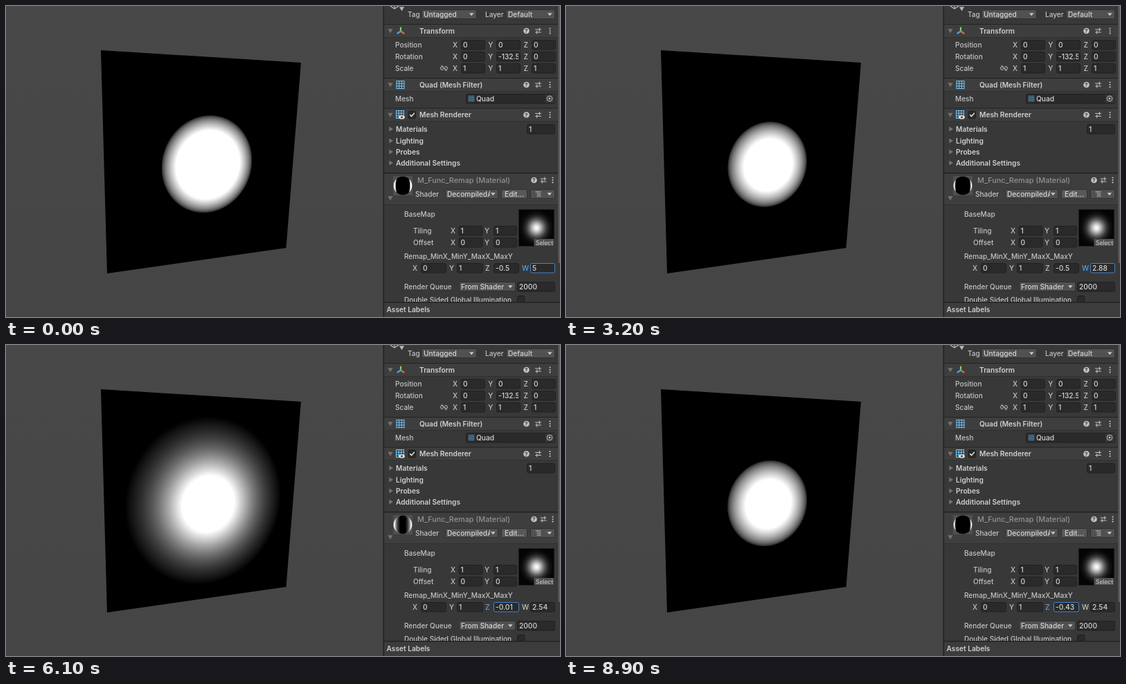
Recreate the animation shown at these times as an HTML page with a canvas. Size 800 px wide and 450 px high, loop 9.3 s.

```html
<!DOCTYPE html>
<html lang="en">
<head>
<meta charset="utf-8">
<title>Remap material</title>
<style>
html, body { margin: 0; width: 100%; height: 100%; overflow: hidden; background: #464646; }
#stage { position: absolute; left: 0; top: 0; width: 800px; height: 450px; overflow: hidden;
  background: linear-gradient(#484848, #454545); }
#stage > * { position: absolute; left: 0; top: 0; display: block; }
#quad { clip-path: polygon(137px 64px, 426px 82px, 404.5px 350px, 146px 387px); }
#stage #ball { left: 559px; top: 246px; }
text { font-family: Inter, "Liberation Sans", sans-serif; font-size: 10.05px; font-weight: 500; fill: #c4c4c4; white-space: pre; }
.b { font-size: 10.2px; font-weight: 600; fill: #d0d0d0; }
.v { font-size: 10.2px; fill: #d6d6d6; }
</style>
</head>
<body>
<div id="stage">
  <canvas id="quad" width="440" height="400"></canvas>
  <svg id="panel" width="800" height="450" viewBox="0 0 800 450"></svg>
  <canvas id="ball" width="28" height="28"></canvas>
</div>
<script>
const LOOP = 9300, STEP = 100;
const glow = r => Math.exp(-.4 * r - 3.85 * r * r);
const $ = id => document.getElementById(id);

// ---- inspector panel ----
let out = '';
const add = s => { out += s; };
const rect = (x, y, w, h, fill, more = '') =>
  add(`<rect x="${x}" y="${y}" width="${w}" height="${h}" fill="${fill}" ${more}/>`);
const path = (d, color, w = 1) =>
  add(`<path d="${d}" fill="none" stroke="${color}" stroke-width="${w}" stroke-linecap="round" stroke-linejoin="round"/>`);
const text = (x, y, s, more = '') => add(`<text x="${x}" y="${y + 3.7}" ${more}>${s}</text>`);
const dot = (x, y, r, fill) => add(`<circle cx="${x}" cy="${y}" r="${r}" fill="${fill}"/>`);
const tri = (x, y, open, fill = '#747474') => add(open
  ? `<path d="M${x - 3.6} ${y - 2.8}h7.2l-3.6 6z" fill="${fill}"/>`
  : `<path d="M${x - 2.6} ${y - 3.6}v7.2l5.6-3.6z" fill="${fill}"/>`);
let clips = 0;

function field(x, y, w, s, id = '') {
  rect(x + .5, y - 6.5, w - 1, 13.5, '#2a2a2a', `rx="2" stroke="#212121" ${id && `id="${id}Box"`}`);
  const clip = 'c' + clips++;
  add(`<clipPath id="${clip}"><rect x="${x + 1}" y="${y - 7}" width="${w - 4}" height="14"/></clipPath>`);
  text(x + 3, y, s, `class="v" clip-path="url(#${clip})" ${id && `id="${id}Text"`}`);
}
function drop(x, y, w, s) {
  rect(x + .5, y - 6.5, w - 1, 13, '#515151', 'rx="2" stroke="#303030"');
  const clip = 'c' + clips++;
  add(`<clipPath id="${clip}"><rect x="${x}" y="${y - 7}" width="${w - 12}" height="14"/></clipPath>`);
  text(x + 3, y, s, `class="v" clip-path="url(#${clip})"`);
  add(`<path d="M${x + w - 11} ${y - 1.8}h6.6l-3.3 4z" fill="#c8c8c8"/>`);
}
function vec(y, vals) {
  ['X', 'Y', 'Z'].forEach((k, i) => {
    text(645 + i * 51.3, y, k);
    field(657 + i * 51, y, 35, vals[i]);
  });
}
function tools(y, xs) {
  const [a, b, c] = xs;
  dot(a, y, 4.3, '#c4c4c4');
  text(a - 2.4, y - .6, '?', 'style="font-size:8px;font-weight:700;fill:#3a3a3a"');
  path(`M${b - 4} ${y - 2}h8M${b - 4} ${y + 2}h8M${b + 1.8} ${y - 4}v4M${b - 1.8} ${y}v4`, '#c4c4c4', 1.1);
  [-3.4, 0, 3.4].forEach(d => dot(c, y + d, 1.05, '#c4c4c4'));
}
function mesh(x, y, r, line, w) {
  rect(x - r, y - r, r * 2, r * 2, '#2f4350', 'rx="1"');
  let d = '';
  for (let i = 0; i < 4; i++) {
    const p = -r + i * r * 2 / 3;
    d += `M${x - r} ${y + p}h${r * 2}M${x + p} ${y - r}v${r * 2}`;
  }
  path(d, line, w);
}
function header(y, title) {
  rect(546, y - 10, 254, 20, '#3e3e3e');
  rect(546, y - 10, 254, 1, '#222');
  rect(546, y + 9, 254, 1, '#303030');
  tri(555, y, true);
  text(597, y, title, 'class="b"');
  tools(y, [751.5, 768.5, 785.5]);
}
function check(x, y) {
  rect(x + .5, y - 5.5, 10.5, 11, '#2a2a2a', 'rx="2" stroke="#1e1e1e"');
}

function buildPanel() {
  rect(545, 0, 255, 450, '#383838');
  path('M555 0l6 4l6-4M561 4v-4', '#c4c4c4', 1.1);
  tri(571.5, 4, true, '#b8b8b8');
  text(580, 12, 'Tag');
  drop(600, 12, 80, 'Untagged');
  text(692, 12, 'Layer');
  drop(722, 12, 71, 'Default');

  header(36, 'Transform');
  path('M570 36.5v-5', '#8fd14a', 2.2);
  path('M570 36.5l4.5 3', '#e8643c', 2.2);
  path('M570 36.5l-4.5 3', '#4ba3e6', 2.2);
  text(562, 56, 'Position'); vec(56, ['0', '0', '0']);
  text(562, 73, 'Rotation'); vec(73, ['0', '-132.5', '0']);
  text(562, 90, 'Scale'); vec(90, ['1', '1', '1']);
  path('M631 87.5h-1a2.4 2.4 0 0 0 0 5h1M634 87.5h1a2.4 2.4 0 0 1 0 5h-1M630.5 90h4M629 86l7 8', '#c4c4c4');

  header(114, 'Quad (Mesh Filter)');
  mesh(569.5, 114, 5.5, '#7fc3ee', 1);
  text(562, 134, 'Mesh');
  field(664, 134, 129, '');
  mesh(672, 134, 3.8, '#5f93b4', .6);
  text(679, 134, 'Quad', 'class="v"');
  rect(779, 128, 13, 12, '#373737');
  add('<circle cx="785" cy="134" r="3.8" fill="none" stroke="#c4c4c4"/>');
  dot(785, 134, 1.4, '#c4c4c4');

  header(157.5, 'Mesh Renderer');
  mesh(569, 157, 5.5, '#7fc3ee', 1);
  add('<ellipse cx="571.5" cy="161" rx="4.4" ry="2.8" fill="#dedede"/>');
  dot(571.5, 161, 1.4, '#3e3e3e');
  check(580.5, 157.5);
  path('M583.5 157.5l2 2.3l4-4.6', '#e0e0e0', 1.5);
  [['Materials', 178], ['Lighting', 195], ['Probes', 211], ['Additional Settings', 227]].forEach(([s, y]) => {
    tri(556, y, false);
    text(563, y, s, 'class="b"');
  });
  field(752, 178, 41, '1');

  rect(546, 242, 254, 46, '#3e3e3e');
  rect(546, 241, 254, 1.5, '#222');
  rect(546, 287, 254, 1, '#303030');
  rect(559, 246, 28, 28, '#505050');
  tri(555, 278, true);
  text(594, 252, 'M_Func_Remap (Material)', 'style="font-size:10.8px;fill:#929292"');
  tools(252, [762.5, 776, 789.5]);
  text(591, 272, 'Shader');
  drop(634, 272, 77, 'DecompiledArt');
  rect(715.5, 265.5, 37, 13, '#585858', 'rx="2" stroke="#303030"');
  text(720, 272, 'Edit...', 'class="v"');
  rect(757.5, 265.5, 35, 13, '#515151', 'rx="2" stroke="#303030"');
  path('M765 269h7M767 272h5M767 275h5', '#c8c8c8', 1.1);
  add('<path d="M781.5 270.2h6.6l-3.3 4z" fill="#c8c8c8"/>');

  text(575, 301, 'BaseMap');
  [['Tiling', 325, '1'], ['Offset', 342, '0']].forEach(([s, y, n]) => {
    text(588, y, s);
    text(642, y, 'X'); field(653.5, y, 35, n);
    text(691, y, 'Y'); field(704, y, 34, n);
  });
  let stops = '';
  for (let i = 0; i <= 10; i++) {
    const c = Math.round(255 * glow(i / 10));
    stops += `<stop offset="${i / 10}" stop-color="rgb(${c},${c},${c})"/>`;
  }
  add(`<radialGradient id="glow">${stops}</radialGradient>`);
  rect(740.5, 294.5, 51, 53, 'url(#glow)', 'stroke="#1c1c1c"');
  rect(762.5, 337, 29, 10.5, '#515151');
  text(765, 341.8, 'Select', 'style="font-size:8.4px"');

  text(575, 362, 'Remap_MinX_MinY_MaxX_MaxY');
  text(587, 379, 'X'); field(599, 379, 37, '0');
  text(640, 379, 'Y'); field(651, 379, 38, '1');
  text(692, 379, 'Z', 'id="zLabel"'); field(704, 379, 37, '-0.5', 'z');
  text(745, 379, 'W', 'id="wLabel"'); field(757, 379, 36, '5', 'w');
  text(575, 406, 'Render Queue');
  drop(654, 406, 82, 'From Shader');
  field(738, 406, 55, '2000');
  text(575, 425, 'Double Sided Global Illumination');
  check(738, 425);
  rect(797.5, -2, 2.5, 374, '#5c5c5c', 'rx="1.2"');

  rect(546, 428, 254, 22, '#3c3c3c');
  rect(546, 428, 254, 1.5, '#222');
  text(549.5, 439, 'Asset Labels', 'class="b"');
  rect(544.5, 0, 1.5, 450, '#202020');
  $('panel').innerHTML = out;
}

// ---- shading ----
const toLinear = c => c <= .04045 ? c / 12.92 : ((c + .055) / 1.055) ** 2.4;
const toSrgb = c => c <= .0031308 ? c * 12.92 : 1.055 * c ** (1 / 2.4) - .055;
const TONES = 8191;
const tone = Uint8Array.from({ length: TONES + 1 }, (_, i) => Math.round(255 * toSrgb(i / TONES)));
const sample = (x, y) => toLinear(glow(Math.hypot(x, y)));

// Inverse of the perspective map from the unit square to the four corners
function unproject([[x0, y0], [x1, y1], [x2, y2], [x3, y3]]) {
  const dx1 = x1 - x2, dx2 = x3 - x2, sx = x0 - x1 + x2 - x3;
  const dy1 = y1 - y2, dy2 = y3 - y2, sy = y0 - y1 + y2 - y3;
  const den = dx1 * dy2 - dy1 * dx2;
  const g = (sx * dy2 - sy * dx2) / den, h = (dx1 * sy - dy1 * sx) / den;
  const a = x1 - x0 + g * x1, b = x3 - x0 + h * x3, c = x0;
  const d = y1 - y0 + g * y1, e = y3 - y0 + h * y3, f = y0;
  return (x, y) => {
    const w = (d * h - e * g) * x + (b * g - a * h) * y + a * e - b * d;
    return [
      ((e - f * h) * x + (c * h - b) * y + b * f - c * e) / w,
      ((f * g - d) * x + (a - c * g) * y + c * d - a * f) / w
    ];
  };
}

// base(x, y) gives the texture value and the coverage of each pixel
function shader(canvas, base) {
  const { width: w, height: h } = canvas, ctx = canvas.getContext('2d');
  const img = ctx.createImageData(w, h), vals = new Float32Array(w * h);
  for (let i = 0; i < w * h; i++) {
    const [v, cover] = base(i % w + .5, Math.floor(i / w) + .5);
    vals[i] = v;
    img.data[i * 4 + 3] = 255 * cover;
  }
  return (lo, hi) => {
    for (let i = 0, p = 0; i < vals.length; i++, p += 4) {
      const o = Math.min(1, Math.max(0, lo + vals[i] * (hi - lo)));
      img.data[p] = img.data[p + 1] = img.data[p + 2] = tone[o * TONES + .5 | 0];
    }
    ctx.putImageData(img, 0, 0);
  };
}

// The glow sits slightly right of and below the texture centre
const toUv = unproject([[137, 64], [426, 82], [404.5, 350], [146, 387]]);
const paintQuad = shader($('quad'), (x, y) => {
  const [u, v] = toUv(x, y);
  return [sample(u * 2 - 1.013, v * 2 - 1.012), 1];
});
const paintBall = shader($('ball'), (x, y) => {
  const px = (x - 14) / 13.3, py = (y - 14) / 13.3, r = Math.hypot(px, py);
  const lat = Math.asin(Math.max(-1, Math.min(1, py)));
  const lon = Math.asin(Math.min(1, Math.abs(px) / Math.max(.01, Math.cos(lat))));
  const cover = Math.max(0, Math.min(1, (1 - r) * 13.3 + .5));
  return [sample(1 - lon * 2 / Math.PI, lat * 1.6 / Math.PI), cover];
});

// ---- motion ----
const wKeys = [[0, 5], [1000, 2], [2000, 6.1], [2300, 3.91], [2900, 1.8], [3000, 1.8],
  [3800, 6.1], [3900, 6.1], [4100, 4.46], [4400, 2.54]];
const zKeys = [[5200, -.5], [5500, -.8], [5600, -.8], [6100, -.01], [6200, .12], [6400, .12],
  [7000, -.43], [7200, -.43], [7700, .34], [7800, .44], [7900, .44], [8600, -.37], [8800, -.37], [8900, -.43]];

function at(keys, t) {
  const i = keys.findIndex(k => k[0] > t);
  if (i === 0) return keys[0][1];
  if (i < 0) return keys[keys.length - 1][1];
  const [t0, a] = keys[i - 1], [t1, b] = keys[i];
  return +(a + (b - a) * (t - t0) / (t1 - t0)).toFixed(2);
}

function focus(id, on) {
  $(id + 'Box').setAttribute('stroke', on ? '#4384c9' : '#212121');
  $(id + 'Label').style.fill = on ? '#5b9fe3' : '#c4c4c4';
}

let last = -1;
function render(ms) {
  const t = Math.floor(ms % LOOP / STEP) * STEP;
  if (t === last) return;
  last = t;
  const z = at(zKeys, t), w = at(wKeys, t);
  paintQuad(z, w);
  paintBall(z, w);
  $('zText').textContent = z;
  $('wText').textContent = w;
  focus('w', t < 4900);
  focus('z', t >= 4900);
}

buildPanel();
render(0);
const start = performance.now();
(function tick() {
  render(performance.now() - start);
  requestAnimationFrame(tick);
})();
</script>
</body>
</html>
```
